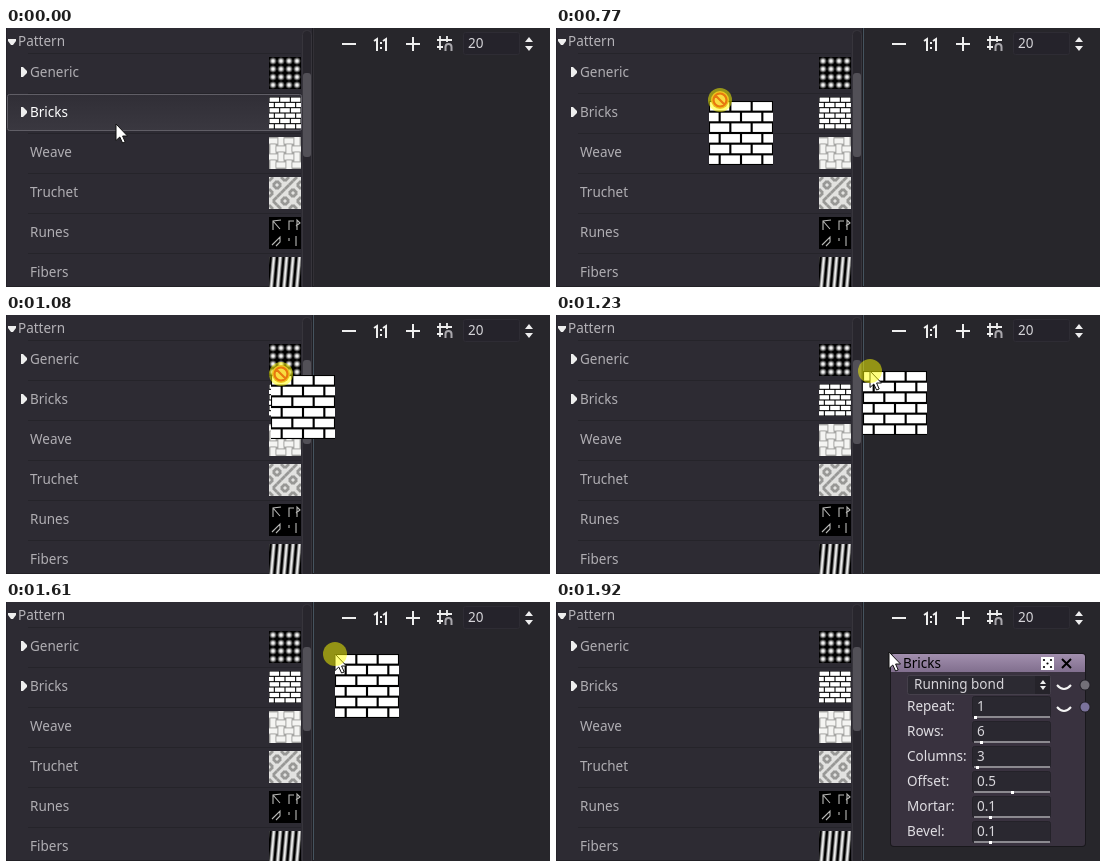
Write an HTML page with a canvas that moves like this. It is 544x259 px and loops after 2.32 s.

```html
<!DOCTYPE html>
<html lang="en">
<head>
<meta charset="utf-8">
<title>Drag a pattern into the graph</title>
<style>
  html, body { margin: 0; width: 100%; height: 100%; overflow: hidden; background: #27262b; }
  canvas { display: block; }
</style>
</head>
<body>
<canvas id="stage" width="544" height="259"></canvas>
<script>
const ctx = document.getElementById('stage').getContext('2d');
const LOOP = 2320, PRESS = 460, DROP = 1920, PANEL_EDGE = 307, LAG = 0.37;
const FONT = '13.5px "Noto Sans", sans-serif';

// Pointer positions: [start time, x, y]
const pointerPath = [
  [0, 110, 96], [80, 92, 89], [190, 78, 86],
  [610, 103, 74], [690, 133, 74], [770, 164, 72], [840, 192, 70],
  [920, 222, 67], [1000, 249, 63], [1080, 275, 59], [1150, 296, 57],
  [1230, 314, 56], [1300, 325, 55], [1380, 328, 53], [1460, 328, 53],
  [1610, 329, 52], [1690, 331, 50], [1770, 332, 49], [1920, 333, 50]
];

function rect(x, y, w, h, color) {
  ctx.fillStyle = color;
  ctx.fillRect(x, y, w, h);
}

function roundRect(x, y, w, h, radius, fill, stroke) {
  ctx.beginPath();
  ctx.roundRect(x, y, w, h, radius);
  if (fill) { ctx.fillStyle = fill; ctx.fill(); }
  if (stroke) { ctx.strokeStyle = stroke; ctx.lineWidth = 1; ctx.stroke(); }
}

function disc(x, y, r, color) {
  ctx.fillStyle = color;
  ctx.beginPath();
  ctx.arc(x, y, r, 0, Math.PI * 2);
  ctx.fill();
}

function text(value, x, baseline, color) {
  ctx.font = FONT;
  ctx.fillStyle = color;
  ctx.fillText(value, x, baseline);
}

function fillPath(path, color) {
  ctx.fillStyle = color;
  ctx.fill(new Path2D(path));
}

function strokePath(path, color, width) {
  ctx.strokeStyle = color;
  ctx.lineWidth = width;
  ctx.stroke(new Path2D(path));
}

function verticalGradient(y0, y1, ...colors) {
  const g = ctx.createLinearGradient(0, y0, 0, y1);
  colors.forEach((c, i) => g.addColorStop(i / (colors.length - 1), c));
  return g;
}

// Draws inside a clipped square whose corner becomes the origin
function tile(x, y, size, draw) {
  ctx.save();
  ctx.translate(x, y);
  ctx.beginPath();
  ctx.rect(0, 0, size, size);
  ctx.clip();
  draw(size);
  ctx.restore();
}

// Visits the 8 px cells of a 4 by 4 icon
function eachCell(draw) {
  for (let i = 0; i < 16; i++) draw(i % 4, Math.floor(i / 4));
}

function dots(size) {
  rect(0, 0, size, size, '#000');
  eachCell((col, row) => {
    const x = col * 8 + 4, y = row * 8 + 4;
    const glow = ctx.createRadialGradient(x, y, 0, x, y, 4);
    glow.addColorStop(0, '#fff');
    glow.addColorStop(0.3, '#e4e4e4');
    glow.addColorStop(0.65, '#666');
    glow.addColorStop(1, '#000');
    disc(x, y, 4, glow);
  });
}

function bricks(size) {
  const w = size / 3, h = size / 6, mortar = size / 60;
  rect(0, 0, size, size, '#000');
  for (let row = 0; row < 6; row++) {
    for (let col = 0; col < 4; col++) {
      const x = (col - row % 2 / 2) * w;
      rect(x + mortar, row * h + mortar, w - mortar * 2, h - mortar * 2, '#fff');
    }
  }
}

function weave(size) {
  rect(0, 0, size, size, '#8a8a88');
  eachCell((col, row) => {
    const [w, h] = (col + row) % 2 ? [6, 10] : [10, 6];
    roundRect(col * 8 + 4 - w / 2, row * 8 + 4 - h / 2, w, h, 1, '#f4f4f2', '#b4b4b2');
  });
}

function truchet(size) {
  const slants = ['/\\//', '\\//\\', '//\\/', '\\\\/\\'];
  rect(0, 0, size, size, '#e2e2e0');
  eachCell((col, row) => {
    const lines = slants[row][col] === '/' ? 'm4 0l-4 4m8 0l-4 4' : 'm4 0l4 4m-8 0l4 4';
    strokePath(`M${col * 8} ${row * 8}${lines}`, '#989896', 2.8);
  });
}

function runes(size) {
  rect(0, 0, size, size, '#000');
  strokePath('M4 13V4L12 3M4 4L11 12M20 13V4H25M28 13V3L31 6 27 9' +
    'M3 28L11 20V25L7 29M20 21V24M27 19V29', '#b8b8b6', 1.1);
}

function fibers(size) {
  rect(0, 0, size, size, '#000');
  for (let i = -1; i < 6; i++) {
    const line = `M${i * 6.4 + 2} 33l3-34`;
    strokePath(line, '#555', 4.4);
    strokePath(line, '#aaa', 3);
    strokePath(line, '#eee', 1.4);
  }
}

const library = [
  ['Generic', dots, true], ['Bricks', bricks, true], ['Weave', weave],
  ['Truchet', truchet], ['Runes', runes], ['Fibers', fibers]
];

function drawLibrary(hovered) {
  rect(0, 0, PANEL_EDGE, 259, '#2d2b33');
  rect(0, 0, 1, 259, '#25232a');
  rect(306, 0, 1, 259, '#1f1e23');
  rect(307, 0, 1, 259, hovered ? '#323036' : '#46545f');
  rect(0, 258, 308, 1, '#222126');
  fillPath('M2 11h8v2l-3 4h-2l-3-4z', '#eee');
  text('Pattern', 12, 18, '#b5b3b8');
  library.forEach(([name, icon, expandable], i) => {
    const y = 29 + i * 40;
    rect(22, y - 4, 273, 1, '#25242a');
    const active = hovered && name === 'Bricks';
    if (active) {
      roundRect(1.5, y - 2.5, 294, 36, 2, verticalGradient(y - 3, y + 34, '#302e36', '#3a3840'), '#605e66');
    }
    if (expandable) fillPath(`M15 ${y + 10}h2l4 4v2l-4 4h-2z`, '#eee');
    text(name, 24, y + 20, active ? '#fff' : '#b0aeb3');
    tile(263, y, 32, icon);
  });
  roundRect(296.5, 2.5, 9, 270, 4, '#28262d', '#37353c');
  roundRect(297, 45, 8, 84, 3, '#525057');
}

function drawToolbar() {
  const white = '#eee';
  rect(336, 15, 14, 2, white);
  rect(400, 15, 14, 2, white);
  rect(406, 9, 2, 14, white);
  strokePath('M368 13l3-2v12M377 13l3-2v12', white, 2);
  rect(374, 14, 2, 2, white);
  rect(374, 19, 2, 2, white);
  strokePath('M434 8V22M441 8V14M431 12H446M431 19H437', white, 1.8);
  strokePath('M439.5 23v-4a3 3 0 0 1 6 0v4', '#aaa8ad', 2);
  roundRect(457.5, 4.5, 56, 22, 2, '#25232b', '#2e2c34');
  text('20', 462, 20, '#d5d4d8');
  fillPath('M519 14l4-5 4 5zM519 18h8l-4 5z', white);
}

function drawNode() {
  const fields = [
    ['Repeat:', '1', 419], ['Rows:', '6', 425], ['Columns:', '3', 421],
    ['Offset:', '0.5', 456], ['Mortar:', '0.1', 434], ['Bevel:', '0.1', 434]
  ];
  roundRect(334, 51, 196, 194, 4, '#19181c');
  roundRect(335, 52, 194, 192, 3, '#39323f');
  roundRect(335, 52, 194, 18, [3, 3, 0, 0], verticalGradient(52, 70, '#a28fae', '#816f8e'));
  text('Bricks', 347, 66, '#000');

  rect(485, 55, 13, 13, '#fff');
  [[488, 58], [495, 58], [491.5, 61.5], [488, 65], [495, 65]].forEach(([x, y]) => disc(x, y, 1.1, '#000'));
  strokePath('M506 57l9 9M515 57l-9 9', '#000', 2);

  roundRect(351.5, 73.5, 143, 19, 2, '#2c2a32', '#45404b');
  rect(479, 74, 15, 18, '#25232a');
  text('Running bond', 358, 87, '#d6d4d9');
  fillPath('M484 82l3-4 3 4zM484 84h6l-3 4z', '#eee');

  fields.forEach(([label, value, handle], i) => {
    const y = 94 + i * 25;
    text(label, 351, y + 15, '#e0dee3');
    roundRect(416.5, y + 0.5, 78, 21, 2, '#2a2830', '#242229');
    text(value, 421, y + 15, '#d8d6db');
    rect(418, y + 20, 76, 2, '#8c8a90');
    rect(handle - 1, y + 20, 3, 3, '#fff');
  });

  [[83, '#737078'], [105, '#7b739c']].forEach(([y, color]) => {
    strokePath(`M501 ${y}q7 8 14 0`, '#f4f4f4', 2);
    disc(529, y, 5.5, '#242229');
    disc(529, y, 4.5, color);
  });
}

function drawArrow(x, y) {
  ctx.save();
  ctx.translate(x, y);
  const arrow = 'M0 0V16.5L3.8 13 6.6 19 9.2 18 6.6 12H11.5Z';
  fillPath(arrow, '#fff');
  strokePath(arrow, '#111', 1);
  ctx.restore();
}

function drawForbidden(x, y) {
  disc(x, y, 9, '#eec51e');
  disc(x, y, 6, '#f8dc40');
  strokePath(`M${x - 4.5} ${y - 4.5}l9 9M${x + 6.5} ${y}a6.5 6.5 0 1 0-13 0a6.5 6.5 0 1 0 13 0`, '#e8780f', 2.2);
}

function render(time) {
  const step = pointerPath.findLastIndex(p => p[0] <= time);
  const [start, x, y] = pointerPath[step];
  const pressed = time >= PRESS && time < DROP;
  const dragging = pressed && start > PRESS;

  rect(0, 0, 544, 259, '#27262b');
  drawLibrary(time < PRESS);
  drawToolbar();
  if (time >= DROP) drawNode();
  if (dragging) {
    const [, lastX, lastY] = pointerPath[step - 1];
    const follow = (now, last) => Math.round(now + (last - now) * LAG);
    tile(follow(x, lastX), follow(y, lastY), 64, bricks);
  }
  const forbidden = dragging && x < PANEL_EDGE;
  if (!forbidden) drawArrow(x, y);
  if (pressed) disc(x, y, 12, 'rgba(255,255,0,0.5)');
  if (forbidden) drawForbidden(x, y);
}

function frame(now) {
  render(now % LOOP);
  requestAnimationFrame(frame);
}
requestAnimationFrame(frame);
</script>
</body>
</html>
```
